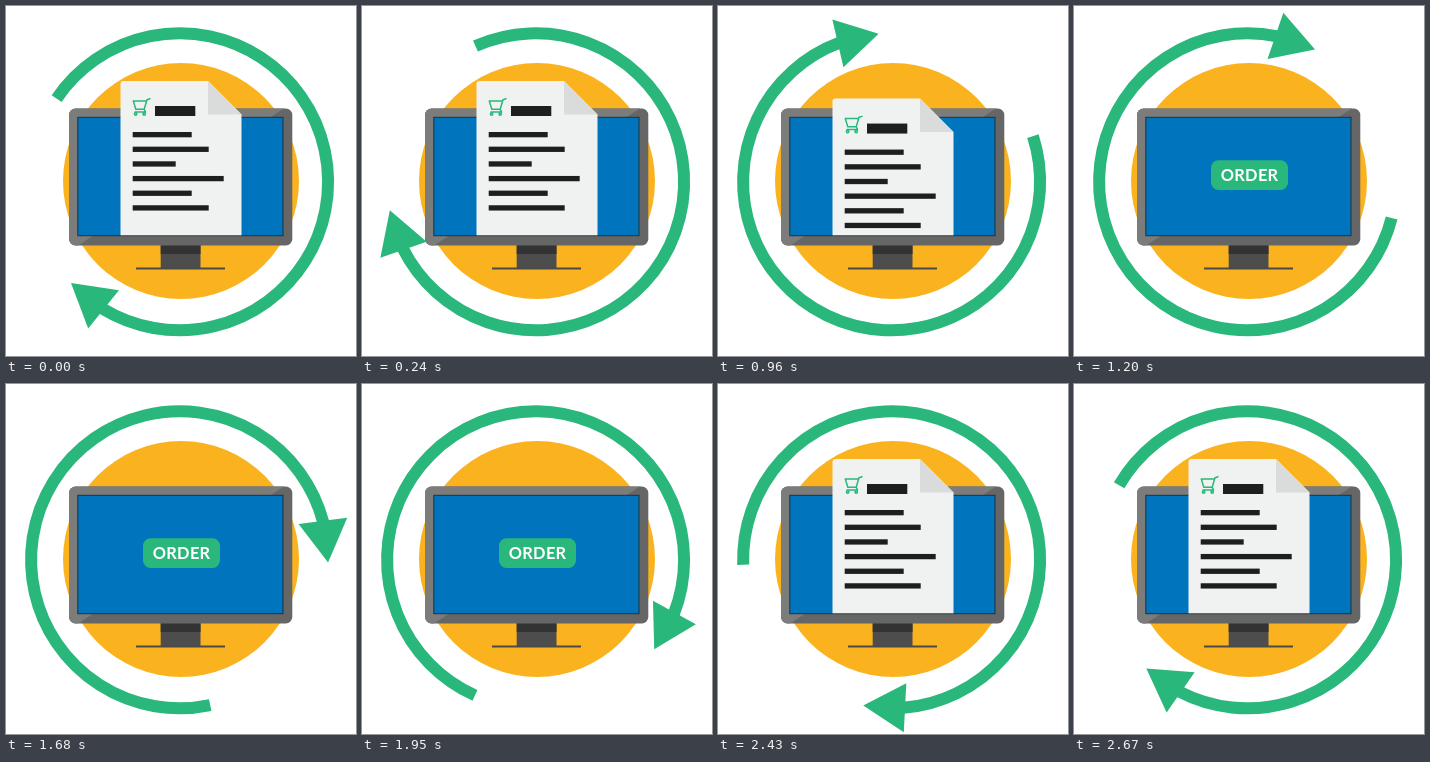
Animation of 350 by 350 pixels, one loop 2700 ms. Source, as an HTML page:

```html
<!DOCTYPE html>
<html lang="en">
<head>
<meta charset="utf-8">
<title>Order</title>
<style>
html, body { margin: 0; width: 100%; height: 100%; overflow: hidden; background: #fff; }
svg { display: block; width: 350px; height: 350px; }
.label { font: 700 16.4px Lato, "Open Sans", sans-serif; letter-spacing: .3px; fill: #fff; text-anchor: middle; }
</style>
</head>
<body>
<svg viewBox="0 0 350 350">
  <defs>
    <clipPath id="bezel"><rect x="63" y="102.5" width="223.3" height="137" rx="6.5"/></clipPath>
    <clipPath id="above"><rect width="350" height="229.3"/></clipPath>
  </defs>
  <rect width="350" height="350" fill="#fff"/>
  <circle cx="175" cy="175" r="118" fill="#fab31e"/>

  <g id="monitor">
    <rect x="154.7" y="238" width="39.8" height="24.5" fill="#4d4d4d"/>
    <rect x="154.7" y="238" width="39.8" height="10" fill="#333"/>
    <rect x="130" y="261.5" width="89" height="2" fill="#4a4a4a"/>
    <g clip-path="url(#bezel)">
      <rect x="60" y="100" width="230" height="142" fill="#666"/>
      <path d="M60 100H281.5L68.5 242H60Z" fill="#7c7c7a"/>
    </g>
    <rect x="71.8" y="111.3" width="205.2" height="118.4" fill="#0074bc" stroke="#22313b"/>
  </g>

  <rect x="137" y="154.3" width="77" height="29.6" rx="7.5" fill="#2ab77b"/>
  <text class="label" x="175.6" y="175">ORDER</text>

  <g clip-path="url(#above)">
    <g id="paper">
      <path d="M117.5 75H202L235.5 108.5V235H114.5V78Q114.5 75 117.5 75Z" fill="#eff2f1"/>
      <path d="M202 75L235.5 108.5H202Z" fill="#dadbdb"/>
      <g id="lines" fill="#1d1f1e"><rect x="149" y="100" width="40.3" height="10"/></g>
      <g fill="none" stroke="#2ab77b" stroke-width="1.5" stroke-linecap="round" stroke-linejoin="round">
        <path d="M144 92.8L141 93.7L138.2 103.3H129.8L127.3 95H140.4M138.2 103.3L139.6 106H129"/>
        <circle cx="129.6" cy="108" r="1.2"/>
        <circle cx="138.2" cy="108" r="1.2"/>
      </g>
    </g>
  </g>

  <g id="ring" fill="#2ab77b">
    <path id="arc" fill="none" stroke="#2ab77b" stroke-width="12"/>
    <path id="head"/>
  </g>
</svg>
<script>
const LOOP = 2700, STEP = 30;
const CX = 173.6, CY = 175.8, R = 148.5;
const TRAVEL = 158, SLIDE = 270, DOWN = 930, UP = 2160;
const get = id => document.getElementById(id);
const polar = deg => {
  const a = deg * Math.PI / 180;
  return [CX + R * Math.cos(a), CY + R * Math.sin(a)];
};

function addLines() {
  [59, 76, 43, 91, 59, 76].forEach((w, i) => {
    const r = document.createElementNS("http://www.w3.org/2000/svg", "rect");
    const box = { x: 126.7, y: 126 + i * 14.65, width: w, height: 5.3 };
    for (const k in box) r.setAttribute(k, box[k]);
    get("lines").append(r);
  });
}

function buildRing() {
  const tail = polar(-145.9), base = polar(120.8), tip = polar(137);
  get("arc").setAttribute("d", `M${tail}A${R} ${R} 0 1 1 ${polar(121.5)}`);
  const dx = tip[0] - base[0], dy = tip[1] - base[1];
  const k = 24.5 / Math.hypot(dx, dy);
  const left = [base[0] - dy * k, base[1] + dx * k];
  const right = [base[0] + dy * k, base[1] - dx * k];
  get("head").setAttribute("d", `M${tip}L${left}L${right}Z`);
}

const ramp = (t, start) => Math.min(1, Math.max(0, (t - start) / SLIDE));

function draw(now) {
  const t = Math.floor((now % LOOP) / STEP) * STEP;
  const drop = TRAVEL * (ramp(t, DOWN) - ramp(t, UP));
  get("ring").setAttribute("transform", `rotate(${t / LOOP * 360} ${CX} ${CY})`);
  get("paper").setAttribute("transform", `translate(0 ${drop})`);
}

addLines();
buildRing();
let origin;
function tick() {
  const now = performance.now();
  origin ??= now;
  draw(now - origin);
  requestAnimationFrame(tick);
}
tick();
</script>
</body>
</html>
```
